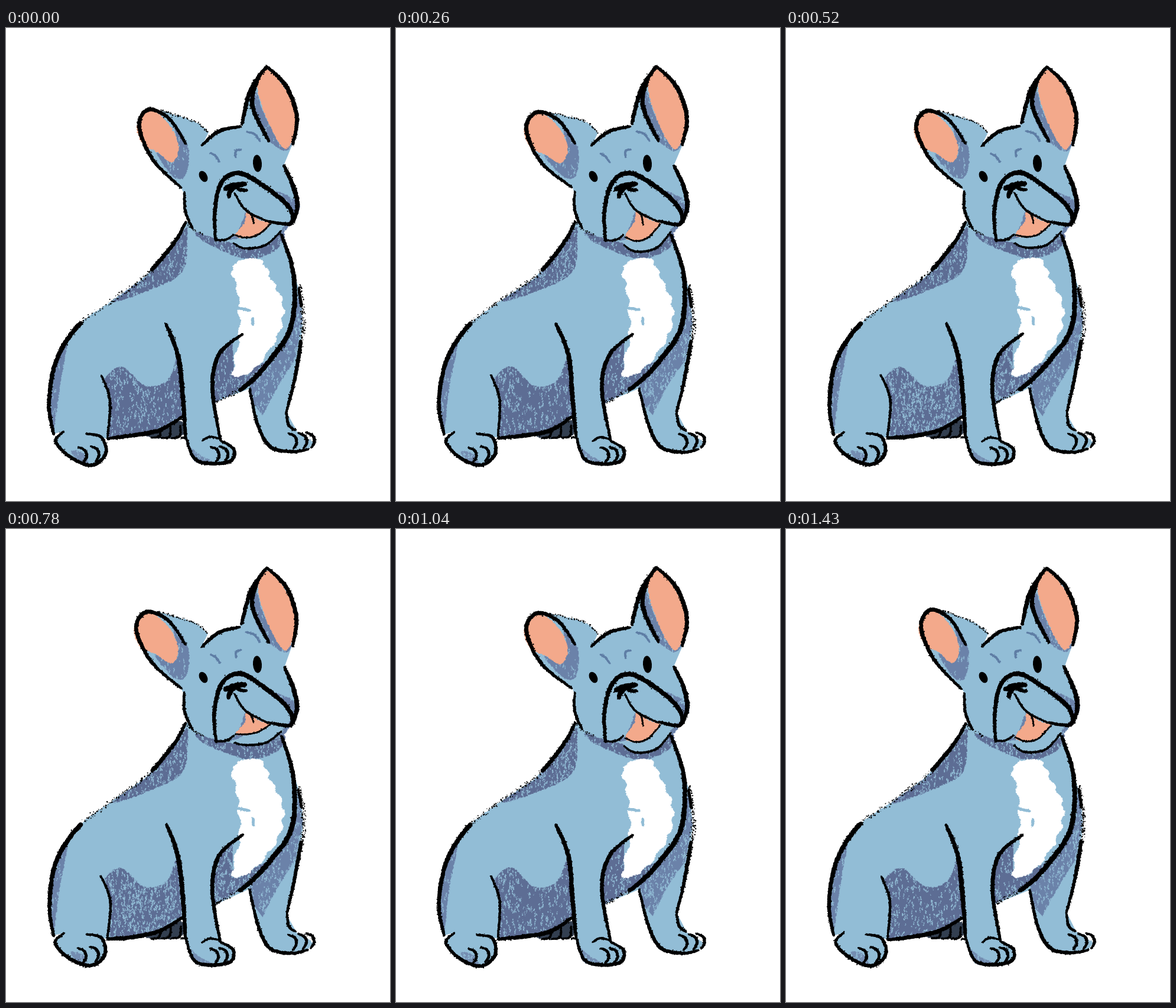
An HTML page with a canvas that plays this animation: 650x800 px, repeating every 1.56 s.

```html
<!DOCTYPE html>
<html>
<head>
<meta charset="utf-8">
<title>Dog</title>
<style>
html, body { margin: 0; width: 100%; height: 100%; overflow: hidden; background: #fff; }
canvas { display: block; width: 650px; height: 800px; }
</style>
</head>
<body>
<canvas id="stage" width="650" height="800"></canvas>
<script>
const BLUE = '#92bdd6', SHADE = '#5d6d94', MID = '#6b82a9', PINK = '#f3a98b', INK = '#000';
const STEP = 130, COUNT = 12;
const JAW = [0, 4, 6, 4, 0, -3, -6, 0, 6, 6, 4, 5];
const EAR = [[0, 0], [-4, 4], [-4, 2], [3, -1]];

// Contours shared by the fills and the ink: x y pairs
const BACK = '304 328 284 364 238 418 180 460 123 503 85 563 73 635 81 688';
const HIND = '98 683 84 700 108 726 144 739 168 720 162 692 136 686';
const BELLY = '172 694 212 690 260 680 299 657';
const THIGH = '161 587 176 630 172 692';
const LEG = '271 500 291 552 299 622 304 690';
const FORE = '304 690 318 728 345 737 380 732 385 712 363 698';
const FRONT = '401 517 361 552 349 610 363 698';
const CHEST = '466 349 487 420 483 505 446 563 405 605 354 634';
const OUTER = '495 440 502 500 490 585 475 650';
const INNER = '412 610 427 672 448 709 485 717 512 712';
const EAR_L = '297 270 249 223 225 167 242 138 277 154 304 196';
const EAR_BACK = '262 139 318 158 342 177';
const SKULL = '331 199 360 175 397 166';
const EAR_IN = '399 162 414 106 441 65';
const EAR_OUT = '441 65 474 98 492 150 485 198';
const FACE_R = '471 233 487 270 493 300 486 328';
const FACE_L = '302 277 303 310 316 340';
const MUZZLE = '355 360 353 310 365 262 395 245 438 268 478 303 482 331 444 327';

let g, variant, shapeNo, seed;

function rnd() {
  seed = seed + 0x6D2B79F5 | 0;
  let t = Math.imul(seed ^ seed >>> 15, 1 | seed);
  t = t + Math.imul(t ^ t >>> 7, 61 | t) ^ t;
  return ((t ^ t >>> 14) >>> 0) / 4294967296;
}
const spread = a => (rnd() * 2 - 1) * a;
const reseed = () => { seed = variant * 7919 + ++shapeNo * 104729; };
const flip = s => s.match(/\S+ \S+/g).reverse().join(' ');

// The left ear shifts between drawings, everything else wavers slightly
function place(x, y) {
  if (x < 305 && y < 265) {
    const k = Math.min(1, (305 - x) / 55) * Math.min(1, (265 - y) / 50);
    x += EAR[variant][0] * k;
    y += EAR[variant][1] * k;
  }
  return [x + Math.sin(y * .045 + variant * 2.1) * .6, y + Math.sin(x * .05 + variant * 1.7) * .6];
}

// Catmull-Rom curve sampled about every pixel: [x, y, progress]
function curve(text, closed) {
  const p = text.match(/\S+ \S+/g).map(s => place(...s.split(' ').map(Number)));
  const c = p.length, segs = closed ? c : c - 1, out = [];
  const at = i => closed ? p[(i + c) % c] : p[Math.max(0, Math.min(c - 1, i))];
  for (let i = 0; i < segs; i++) {
    const [a, b, d, e] = [at(i - 1), at(i), at(i + 1), at(i + 2)];
    const m = Math.ceil(Math.hypot(d[0] - b[0], d[1] - b[1])) || 1;
    for (let j = 0; j < m; j++) {
      const t = j / m;
      const f = k => b[k] + .5 * t * (d[k] - a[k] + t * (2 * a[k] - 5 * b[k] + 4 * d[k] - e[k]
        + t * (3 * (b[k] - d[k]) + e[k] - a[k])));
      out.push([f(0), f(1), (i + t) / segs]);
    }
  }
  return out;
}

function dot(x, y, r) {
  g.beginPath();
  g.arc(x, y, r, 0, 7);
  g.fill();
}

// Crumbly fill of one closed curve or several joined ones; grain is the density of coat flecks
function area(color, parts, grain = 0, bump = 0) {
  reseed();
  const pts = Array.isArray(parts) ? parts.flatMap(p => curve(p)) : curve(parts, true);
  g.save();
  g.fillStyle = color;
  g.beginPath();
  for (const [x, y, t] of pts) g.lineTo(x + spread(1.2) + bump * Math.sin(t * 110), y + spread(1.2));
  g.fill();
  if (grain) {
    g.clip();
    g.fillStyle = BLUE;
    const xs = pts.map(p => p[0]), ys = pts.map(p => p[1]);
    const x0 = Math.min(...xs), y0 = Math.min(...ys);
    const w = Math.max(...xs) - x0, h = Math.max(...ys) - y0;
    for (let i = w * h * grain; i > 0; i--) {
      const x = x0 + rnd() * w, y = y0 + rnd() * h, len = 1 + rnd() * 5;
      for (let k = 0; k < len; k++) dot(x + spread(1), y + k * 1.4, .3 + rnd() * .9);
    }
  }
  g.restore();
}

// Crayon stroke, thinner at its ends, dry between the two shares of its length
function line(text, w, from = 1, to = 1, color = INK) {
  reseed();
  g.fillStyle = color;
  for (const [x, y, t] of curve(text)) {
    const d = w * (.5 + .5 * Math.sqrt(Math.sin(Math.PI * t)));
    if (t < from || t > to) {
      dot(x + spread(d * .12), y + spread(d * .12), d * (.4 + rnd() * .1));
      dot(x + spread(d * .6), y + spread(d * .6), .5 + rnd() * .7);
    } else if (rnd() < .8) {
      dot(x + spread(d * .5), y + spread(d * .5), .4 + rnd() * .9);
    }
  }
}
const dryLine = (text, w) => line(text, w, 0, 1);

function blob(x, y, rx, ry, tilt) {
  g.fillStyle = INK;
  g.beginPath();
  g.ellipse(x, y, rx, ry, tilt, 0, 7);
  g.fill();
}

const toe = (x, y) => line(`${x} ${y} ${x + 11} ${y + 5} ${x + 14} ${y + 16} ${x + 8} ${y + 26}`, 5);

function body() {
  area('#333f50', '236 689 268 674 297 664 300 687 268 694');
  for (let x = 246; x < 300; x += 17) line(`${x} 693 ${x + 14} 690 ${x + 16} 672`, 4);

  area(BLUE, [INNER, '521 700 491 682', flip(OUTER), CHEST]);
  area(MID, [OUTER.slice(0, 20), '490 560 460 606 434 656', '418 635 414 602 460 540 490 485'], .03);
  area(BLUE, [BACK, HIND, BELLY, FORE, '357 665 352 633', flip(CHEST), '400 320 304 328']);

  const worn = variant == 2 ? .045 : .022;
  area(SHADE, '304 338 280 375 238 420 180 463 250 440 299 411 307 355', .028);
  area(SHADE, ['166 592 195 573 235 605 273 595 291 548', '291 552 299 622 299 657', flip(BELLY), flip(THIGH)], worn);
  area(SHADE, ['385 532 361 552 349 610 354 634', '354 634 405 605 446 563', '440 564 400 580 384 575'], worn);
  area(MID, '104 532 84 575 76 640 81 680 91 605', .01);
  area(SHADE, '322 346 390 360 466 345 460 374 410 390 343 366', .025);
  area('#748db1', '110 716 129 719 140 737 123 735', .02);
  area('#748db1', '311 710 330 724 350 735 320 734', .02);

  area('#fff', '384 402 428 390 449 425 469 470 461 520 422 574 384 587 395 520 392 450', 0, 2.5);
  line('386 472 413 477', 5, 1, 1, BLUE);
  line('418 490 418 502', 5, 1, 1, BLUE);

  line(BACK, 7.5, .26, .56);
  dryLine('99 533 80 575 71 640', 4);
  line(THIGH, 4.5);
  line(BELLY, 7);
  line(LEG, 7.5);
  line(FRONT, 6.5);
  line(CHEST, 8, .84, 1);
  line(OUTER, 6, .2, .45);
  dryLine('497 435 505 500 492 580', 6);
  line('475 650 479 672 491 681', 5);
  line(INNER, 6);
  for (const [x, y] of [[478, 686], [495, 685], [508, 684], [346, 709], [361, 708], [122, 709], [143, 707]]) toe(x, y);
  line(FORE, 6);
  line('332 699 345 692 361 695', 4);
  line(HIND, 6);
}

function head(m) {
  const chin = `386 ${364 + m * .4} 405 ${372 + m} 440 ${367 + m} 466 ${343 + m * .3}`;
  area(BLUE, [EAR_L, EAR_BACK, SKULL, EAR_IN, EAR_OUT, FACE_R, flip(chin), '386 364 340 352', flip(FACE_L)]);

  area(MID, '284 160 308 202 305 248 285 252 255 212 280 222 290 200', .01);
  area(PINK, '221 166 244 138 277 165 292 202 281 227 255 209 232 198');
  area(MID, '424 108 437 145 470 203 490 178 474 208 438 184 418 140', .01);
  area(PINK, '441 70 473 103 493 155 473 205 443 158 426 98');
  line(EAR_L, 6.5);
  dryLine(EAR_BACK, 4);
  line(SKULL, 6);
  line(EAR_IN, 7);
  line('428 82 417 130 445 192', 7);
  line(EAR_OUT, 7);

  area(MID, '455 277 490 292 495 310 471 346 466 341 484 315', .015);
  line(FACE_R, 7.5);
  line(FACE_L, 5);
  dryLine('306 330 318 342 334 350', 5);
  line(chin, 4);

  const lip = `388 ${350 + m * .5} 406 ${354 + m} 427 ${349 + m} 448 ${331 + m * .2}`;
  area(MID, '407 309 391 347 375 358 395 354 412 335');
  area(PINK, `407 311 404 328 ${lip} 430 325`);
  line(lip, 3);
  line(`410 310 416 318 419 ${331 + m * .5}`, 3);

  line(MUZZLE, 7.5);
  line('354 359 372 358 386 349', 4);
  line('387 279 406 308 444 328', 4);
  line('371 272 384 267 406 263', 10);
  line('388 268 380 276 377 286', 8);
  line('388 268 397 273 408 274', 6);

  blob(334, 251, 6.5, 10, -.5);
  blob(425.5, 229, 7.5, 14.5, -.08);
  for (const brow of ['346 212 355 217 362 227', '398 205 389 208 389 219', '407 175 420 179 430 192'])
    line(brow, 4, 1, 1, '#5f7ea5');
}

function draw(i) {
  const c = document.createElement('canvas'), half = i / 2;
  c.width = 650;
  c.height = 800;
  g = c.getContext('2d');
  variant = i % 2 ? 3 : Math.min(half, 5 - half);
  shapeNo = 0;
  g.fillStyle = '#fff';
  g.fillRect(0, 0, 650, 800);
  body();
  head(JAW[i]);
  return c;
}

const cels = Array.from({ length: COUNT }, (_, i) => draw(i));
const view = document.getElementById('stage').getContext('2d');
const start = performance.now();
function tick() {
  const t = Math.max(0, performance.now() - start);
  view.drawImage(cels[Math.floor(t / STEP) % COUNT], 0, 0);
  requestAnimationFrame(tick);
}
tick();
</script>
</body>
</html>
```
